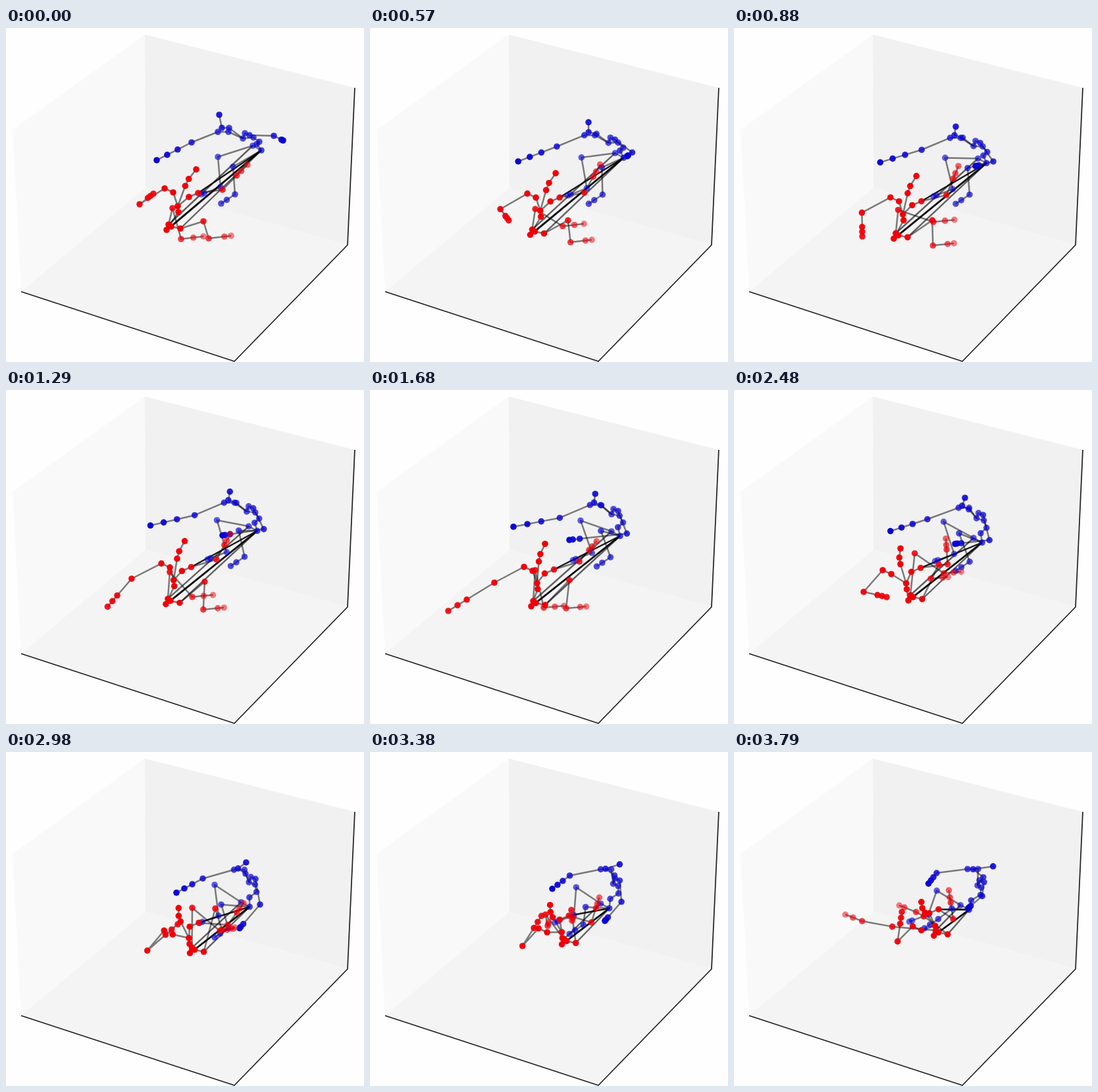
An HTML page with a canvas for the animation above (3890 ms loop, 544 px wide and 508 px high).

```html
<!DOCTYPE html>
<html lang="en">
<head>
<meta charset="utf-8">
<title>Two linked skeletons</title>
<style>
html, body { margin: 0; width: 100%; height: 100%; overflow: hidden; background: #fefefe; }
canvas { display: block; width: 544px; height: 508px; }
</style>
</head>
<body>
<canvas id="stage"></canvas>
<script>
const W = 544, H = 508, LOOP = 3890;
const RED = '#f00008', BLUE = '#0a05d4';
const beats = [0, 880, 1680, 2130, 2480, 2980, 3790];
// From each start on, the picture is refreshed at an even gap.
const paces = [[0, 190], [190, 30], [220, 290], [510, 80], [880, 110], [990, 100],
  [1680, 45], [2180, 100], [2820, 60], [2880, 100]];

// A joint is a function of time that gives [x, y].

// Smooth curve through a few key points, written as beat, x, y.
function path(...numbers) {
  const keys = [];
  for (let i = 0; i < numbers.length; i += 3) {
    keys.push({ time: beats[numbers[i]], point: numbers.slice(i + 1, i + 3) });
  }
  const last = keys.length - 1;
  const slope = (i, axis) => {
    const a = keys[Math.max(i - 1, 0)], b = keys[Math.min(i + 1, last)];
    return (b.point[axis] - a.point[axis]) / (b.time - a.time);
  };
  return time => {
    let i = last - 1;
    while (i > 0 && keys[i].time > time) i--;
    const a = keys[i], b = keys[i + 1], span = b.time - a.time;
    const u = (time - a.time) / span, v = 1 - u;
    return [0, 1].map(axis =>
      a.point[axis] * v * v * (1 + 2 * u) + b.point[axis] * u * u * (3 - 2 * u) +
      span * u * v * (slope(i, axis) * v - slope(i + 1, axis) * u));
  };
}

const between = (a, b, part, dx = 0, dy = 0) => time => {
  const [ax, ay] = a(time), [bx, by] = b(time);
  return [ax + (bx - ax) * part + dx, ay + (by - ay) * part + dy];
};
const near = (a, dx, dy) => between(a, a, 0, dx, dy);
const shifted = (a, offset) => time => {
  const [ax, ay] = a(time), [dx, dy] = offset(time);
  return [ax + dx, ay + dy];
};

// Lower arm or foot: joints spread on the way to the tip.
const reach = (from, tip, ...parts) => [from, ...parts.map(p => between(from, tip, p)), tip];

const limbs = [];
// The opacity runs from the first joint to the last one.
function limb(fill, parent, from, to, joints) {
  limbs.push({ fill, parent, from, to, joints });
}

function buildBlue() {
  const root = path(0, 388, 186, 2, 380, 222, 4, 377, 232, 6, 357, 240);
  const chest = path(0, 360, 168, 2, 367, 189, 6, 370, 203);
  const head = path(0, 324, 132, 1, 337, 150, 4, 351, 164, 6, 394, 174);
  const shoulder = path(0, 322, 158, 3, 338, 178, 6, 355, 178);
  const elbowA = path(0, 282, 174, 3, 291, 197, 6, 308, 184);
  const handA = path(0, 229, 201, 2, 218, 208, 3, 225, 213, 5, 259, 214, 6, 296, 200);
  const elbowB = path(0, 407, 164, 1, 394, 203, 5, 386, 232, 6, 377, 219);
  const handB = path(0, 421, 171, 1, 367, 210, 2, 303, 228, 4, 336, 234,
    5, 355, 268, 6, 356, 237);
  const kneeL = path(0, 322, 196, 5, 317, 202, 6, 308, 211);
  const ankleL = path(0, 326, 242, 3, 338, 249, 5, 323, 249, 6, 295, 247);
  const kneeR = path(0, 345, 211, 1, 355, 213, 4, 342, 218, 5, 327, 232, 6, 331, 238);
  const ankleR = path(0, 348, 253, 3, 366, 256, 5, 338, 268, 6, 310, 254);
  const neck = between(chest, head, .5, -3, 2);
  const hip = near(root, -13, -7);

  limb(BLUE, null, .75, .7, [root, between(root, chest, .25, 0, -5),
    between(root, chest, .5, 11, -4), between(root, chest, .75, 9, -6), chest]);
  limb(BLUE, chest, .75, .9, [neck, between(shoulder, neck, .35, 0, -4), head]);
  limb(BLUE, chest, .7, 1, [near(shoulder, 16, 0), shoulder,
    ...reach(elbowA, handA, .4, .7)]);
  limb(BLUE, chest, .7, 1, [near(chest, 3, -8), near(chest, 10, -5),
    ...reach(elbowB, handB, .82, .94)]);
  limb(BLUE, root, .65, .6, [hip, kneeL, ...reach(ankleL, near(ankleL, -29, 11), .85)]);
  limb(BLUE, root, .7, .7, [kneeR, ...reach(ankleR, near(ankleR, -21, 14), .6)]);
  return { root, hip };
}

function buildRed() {
  const root = path(0, 251, 302, 2, 252, 324, 4, 272, 315, 6, 311, 274);
  const nape = path(0, 261, 271, 3, 255, 297, 5, 278, 283, 6, 306, 264);
  const head = path(0, 289, 215, 2, 266, 234, 4, 253, 241, 6, 285, 228);
  const shoulderA = path(0, 241, 244, 2, 234, 269, 4, 226, 274, 6, 272, 265);
  const elbowA = path(0, 203, 268, 2, 189, 293, 4, 197, 307, 6, 249, 288);
  const handA = path(0, 224, 252, 1, 195, 317, 2, 119, 336, 3, 135, 343,
    4, 232, 315, 5, 261, 262, 6, 255, 243);
  const shoulderB = path(0, 292, 251, 3, 280, 274, 6, 311, 239);
  const elbowB = path(0, 329, 246, 3, 318, 264, 5, 337, 263, 6, 333, 254);
  const handB = path(0, 367, 208, 1, 341, 210, 3, 344, 239, 4, 322, 226,
    5, 361, 230, 6, 326, 210);
  const kneeL = path(0, 253, 274, 2, 251, 274, 5, 283, 237, 6, 240, 266);
  const ankleL = path(0, 266, 321, 1, 303, 295, 2, 264, 331, 3, 298, 289,
    5, 325, 272, 6, 193, 257);
  const kneeR = path(0, 300, 294, 3, 305, 283, 5, 318, 238, 6, 288, 250);
  const ankleR = path(0, 308, 320, 2, 298, 332, 4, 299, 287, 5, 328, 270, 6, 276, 243);
  const toes = path(0, 34, -4, 5, 20, -3, 6, -26, -10);
  const hipL = near(root, -4, -3), hipR = near(root, 14, 3);
  const pelvis = near(root, -7, 5);

  limb(RED, null, 1, 1, [root, pelvis, near(nape, 1, 9), nape]);
  limb(RED, nape, 1, 1, [between(nape, head, .55, -4), between(nape, head, .74, -4), head]);
  limb(RED, nape, 1, .9, [near(shoulderA, 13, 6), shoulderA,
    ...reach(elbowA, handA, .6, .8)]);
  limb(RED, nape, 1, .6, [near(shoulderB, -14, 6), shoulderB,
    ...reach(elbowB, handB, .57, .75)]);
  limb(RED, root, 1, .5, [hipL, kneeL, ...reach(ankleL, shifted(ankleL, toes), .55)]);
  limb(RED, root, 1, .5, [hipR, kneeR, ...reach(ankleR, shifted(ankleR, toes), .7)]);
  return { root, pelvis, hipL, hipR, shoulderB };
}

const blue = buildBlue(), red = buildRed();
// Each link: two joints and its opacity.
const links = [
  [blue.root, red.shoulderB, .9], [blue.root, red.root, .8], [blue.root, red.pelvis, .8],
  [blue.root, red.hipR, .6], [blue.hip, red.hipL, .6]
];

const canvas = document.getElementById('stage');
const ratio = window.devicePixelRatio || 1;
canvas.width = W * ratio;
canvas.height = H * ratio;
const ctx = canvas.getContext('2d');
ctx.scale(ratio, ratio);
ctx.lineJoin = 'round';

function trace(points) {
  ctx.beginPath();
  points.forEach(([x, y]) => ctx.lineTo(x, y));
}

function stroke(points, alpha, width) {
  trace(points);
  ctx.strokeStyle = `rgba(0,0,0,${alpha})`;
  ctx.lineWidth = width;
  ctx.stroke();
}

function pane(color, ...points) {
  trace(points);
  ctx.fillStyle = color;
  ctx.fill();
}

function drawBox() {
  const back = [212, 243], top = [211, 10], left = [23, 401], right = [519, 330];
  const front = [347, 507], rightTop = [530, 91];
  ctx.fillStyle = '#fefefe';
  ctx.fillRect(0, 0, W, H);
  pane('#f9f9f9', [10, 155], top, back, left);
  pane('#f1f1f1', top, rightTop, right, back);
  pane('#f4f4f4', left, back, right, front);
  stroke([left, front, right, rightTop], .88, 1.7);
}

function drawDots({ fill, from, to, joints }, time) {
  ctx.fillStyle = fill;
  joints.forEach((joint, i) => {
    ctx.globalAlpha = from + (to - from) * i / (joints.length - 1);
    ctx.beginPath();
    ctx.arc(...joint(time), 4.8, 0, 2 * Math.PI);
    ctx.fill();
  });
  ctx.globalAlpha = 1;
}

function draw(time) {
  drawBox();
  for (const { parent, joints } of limbs) {
    const chain = parent ? [parent, ...joints] : joints;
    stroke(chain.map(joint => joint(time)), .5, 2.5);
  }
  for (const [a, b, alpha] of links) stroke([a(time), b(time)], alpha, 2.4);
  for (const part of limbs) drawDots(part, time);
}

function heldTime(time) {
  const [start, gap] = paces.filter(([from]) => from <= time).pop();
  return start + Math.floor((time - start) / gap) * gap;
}

const began = performance.now();
let shown = -1;
function tick() {
  const time = heldTime((performance.now() - began) % LOOP);
  if (time !== shown) draw(shown = time);
  requestAnimationFrame(tick);
}
tick();
</script>
</body>
</html>
```
